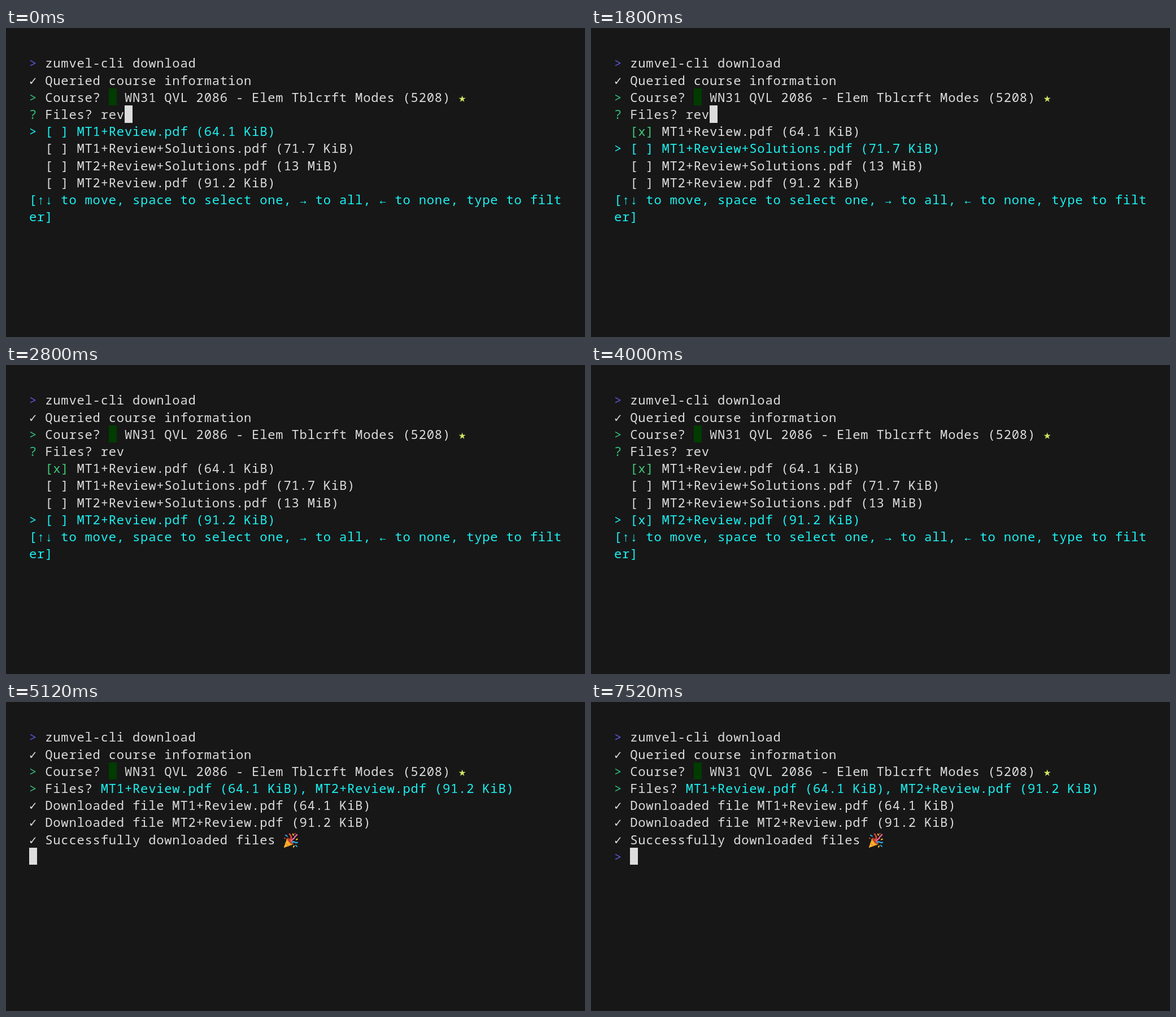
Write an HTML page with a canvas that moves like this. It is 1025x547 px and loops after 8 s.

```html
<!DOCTYPE html>
<html lang="en">
<head>
<meta charset="utf-8">
<title>Terminal download</title>
<style>
  html, body { margin: 0; width: 100%; height: 100%; overflow: hidden; background: #171717; }
  canvas { display: block; }
</style>
</head>
<body>
<canvas id="screen" width="1025" height="547"></canvas>
<script>
const ctx = document.getElementById('screen').getContext('2d');
const LOOP = 8000;
const LEFT = 41, TOP = 46.6, CELL_W = 14.075, CELL_H = 30.23, BASELINE = 23.7;
const BG = '#171717', FG = '#dddddd', CYAN = '#1cf1f1', GREEN = '#2fc27c', CHECKED = '#3ccb77',
      PURPLE = '#5b56e0', YELLOW = '#d3e561', DARK_GREEN = '#003b00';

const FILES = ['MT1+Review.pdf (64.1 KiB)', 'MT1+Review+Solutions.pdf (71.7 KiB)',
               'MT2+Review+Solutions.pdf (13 MiB)', 'MT2+Review.pdf (91.2 KiB)'];
const CHOSEN = [FILES[0], FILES[3]];

// Braille dots as [column, row] pairs, one list per spinner step
const SPINNER = ['00', '00 10', '00 10 11', '00 11', '01 11', '01']
  .map(step => step.split(' ').map(dot => [...dot].map(Number)));
const SPIN_TIMES = [4640, 4760, 4840, 4960, 5040];
const DONE_TIMES = [5000, 5080];

const cellX = col => LEFT + col * CELL_W;
const cellY = row => TOP + row * CELL_H;
const countPassed = (times, t) => times.filter(time => t >= time).length;

function put(row, col, text, color = FG) {
  ctx.fillStyle = color;
  [...text].forEach((char, i) => ctx.fillText(char, cellX(col + i), cellY(row) + BASELINE));
}

function block(row, col, color = FG) {
  const x = Math.round(cellX(col)), y = Math.round(cellY(row));
  ctx.fillStyle = color;
  ctx.fillRect(x, y, Math.round(cellX(col + 1)) - x, Math.round(cellY(row + 1)) - y);
}

function spinner(row, step) {
  ctx.fillStyle = FG;
  for (const [dx, dy] of SPINNER[step]) {
    ctx.beginPath();
    ctx.arc(46 + dx * 6, cellY(row) + 10 + dy * 6, 1.5, 0, 7);
    ctx.fill();
  }
}

function partyPopper(row, col) {
  const shape = (path, color, width) => {
    ctx.fillStyle = ctx.strokeStyle = color;
    ctx.lineWidth = width;
    width ? ctx.stroke(new Path2D(path)) : ctx.fill(new Path2D(path));
  };
  ctx.save();
  ctx.translate(cellX(col) - 0.5, cellY(row) + 3.7);
  ctx.lineCap = 'round';
  shape('M1 25.5L7 9Q15 13 18 20L2 26Q.5 26.5 1 25.5Z', '#ffb42e');
  shape('M4 18L9 23M6 12L14 21', '#f28c1c', 1.8);
  shape('M7 9C9 6 20 16 18 20C16 22 6 13 7 9Z', '#a83a25');
  shape('M11 13C16 10 15 6 11 2', '#e0453a', 2.6);
  shape('M14 15C16 9 19 12 20 8S23 7 24 3', '#f06a9b', 2.4);
  shape('M16 17C18 13 21 19 25 17', '#2da7e0', 2.4);
  shape('M4 4L7 6M22 22L24 24', '#2da7e0', 2);
  shape('M17 2L18 4M23 12L25 11M19 23L18 25', '#ffca28', 2);
  shape('M2 9L3 10M20 2L21 1M13 7L14 8', '#e0453a', 1.8);
  ctx.restore();
}

function drawHeader(done) {
  put(0, 0, '>', PURPLE);
  put(0, 2, 'zumvel-cli download');
  put(1, 0, '✓ Queried course information');
  put(2, 0, '>', GREEN);
  put(2, 2, 'Course?');
  block(2, 10, DARK_GREEN);
  put(2, 12, 'WN31 QVL 2086 - Elem Tblcrft Modes (5208)');
  put(2, 54, '★', YELLOW);
  put(3, 0, done ? '>' : '?', GREEN);
  put(3, 2, 'Files?');
}

function drawPicker(t) {
  const active = countPassed([1800, 2000, 2240], t);
  const checked = [t >= 760, false, false, t >= 3440];
  put(3, 9, 'rev');
  FILES.forEach((file, i) => {
    const row = 4 + i, color = i === active ? CYAN : FG;
    if (i === active) put(row, 0, '>', CYAN);
    put(row, 2, checked[i] ? '[x]' : '[ ]', checked[i] && i !== active ? CHECKED : color);
    put(row, 6, file, color);
  });
  put(8, 0, '[↑↓ to move, space to select one, → to all, ← to none, type to filt', CYAN);
  put(9, 0, 'er]', CYAN);
  if (countPassed([400, 800, 1400, 1800, 2800, 3440, 4000], t) % 2 === 0) block(3, 12);
}

function drawDownload(t) {
  put(3, 9, CHOSEN.join(', '), CYAN);
  CHOSEN.forEach((file, i) => {
    const done = t >= DONE_TIMES[i];
    if (done) put(4 + i, 0, '✓');
    else spinner(4 + i, countPassed(SPIN_TIMES, t));
    put(4 + i, 2, `${done ? 'Downloaded' : 'Downloading'} file ${file}`);
  });
  if (t < 5120) return block(5, 66);

  put(6, 0, '✓ Successfully downloaded files');
  partyPopper(6, 32);
  if (t < 5160) return block(7, 0);

  put(7, 0, '>', PURPLE);
  if (countPassed([5720, 6360, 6920, 7520], t) % 2 === 0) block(7, 2);
}

function render(now) {
  const t = now % LOOP;
  const downloading = t >= 4480;
  ctx.fillStyle = BG;
  ctx.fillRect(0, 0, 1025, 547);
  ctx.font = '22.2px "Noto Sans Mono", "DejaVu Sans Mono", monospace';
  drawHeader(downloading);
  (downloading ? drawDownload : drawPicker)(t);
  requestAnimationFrame(render);
}
requestAnimationFrame(render);
</script>
</body>
</html>
```
